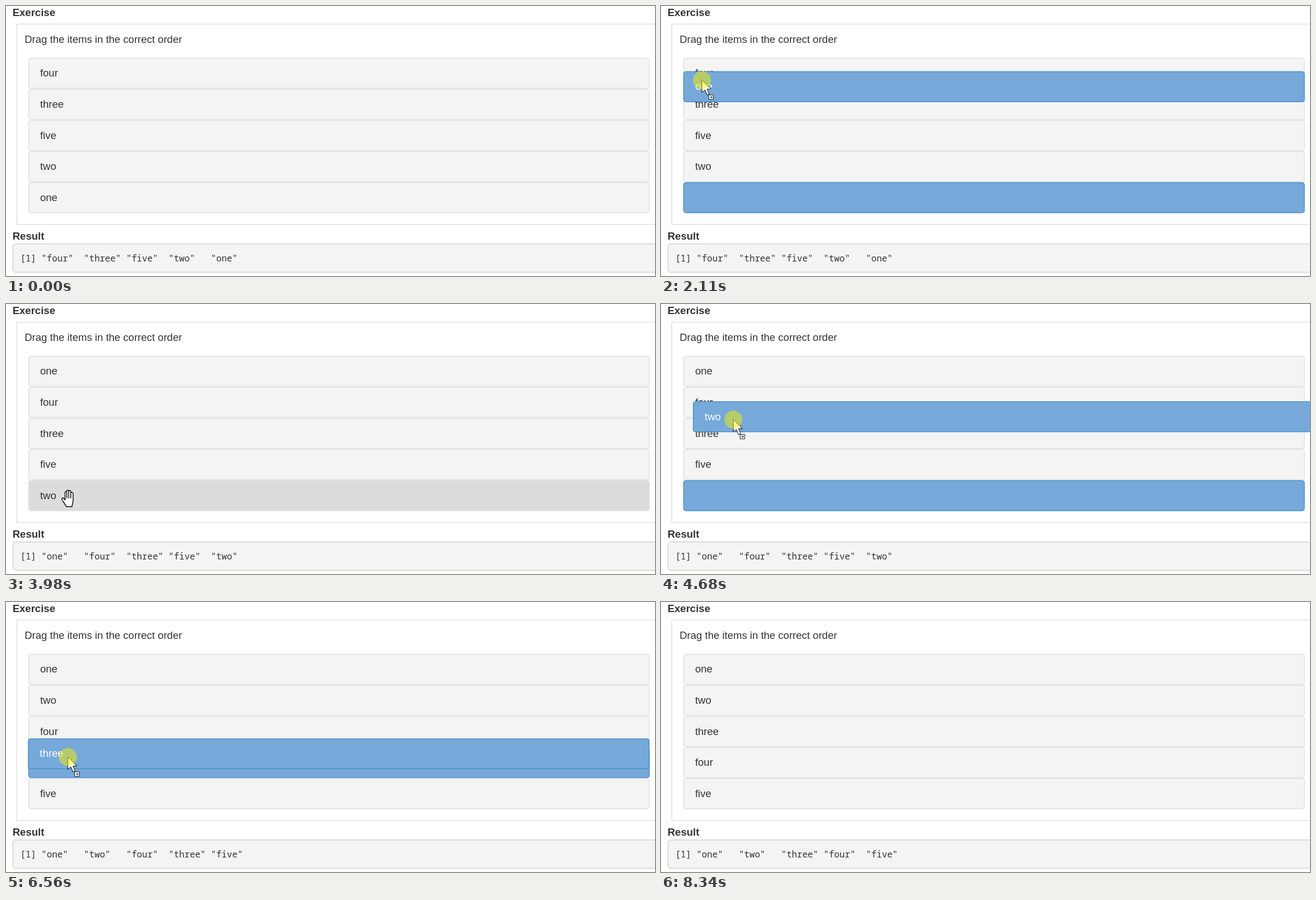
Animation, 1159 px wide and 483 px high, one loop 9.98 s. Source, as an HTML page:

```html
<!DOCTYPE html>
<html lang="en">
<head>
<meta charset="utf-8">
<title>Sortable exercise</title>
<style>
  html, body { margin: 0; width: 100%; height: 100%; overflow: hidden; background: #fff; }
  svg { display: block; }
  text { font: 18.54px "Liberation Sans", Arial, sans-serif; fill: #333; white-space: pre; }
  .heading { font-weight: bold; }
  .code { font: 15.78px "Noto Sans Mono", "DejaVu Sans Mono", monospace; }
  .frame { fill: #fff; stroke: #ddd; stroke-width: 1.3; }
  .output { fill: #f4f4f4; stroke: #ccc; stroke-width: 1.3; }
  .item rect { fill: #f4f4f4; stroke: #ddd; stroke-width: 1.3; }
  .item.hover rect { fill: #dcdcdc; }
  .item.active rect { fill: #76a9da; stroke: #428bca; }
  .item.active text { fill: #fff; }
  .pointer { fill: #fff; stroke: #000; stroke-linejoin: round; stroke-linecap: round; }
</style>
</head>
<body>
<svg id="stage" width="1159" height="483">
  <text class="heading" x="11.7" y="18">Exercise</text>
  <rect class="frame" x="19.3" y="32.4" width="1160" height="358.4"/>
  <text x="33.2" y="65.5">Drag the items in the correct order</text>
  <g id="list"></g>
  <text class="heading" x="11.7" y="417.5">Result</text>
  <rect class="output" x="12.5" y="425.7" width="1170" height="50.6" rx="5"/>
  <text id="result" class="code" x="25.5" y="456.5"></text>
  <g id="ghost"></g>
  <g id="cursor">
    <path id="arrow" class="pointer" d="M0 0V17L4 13.3L7 20.2L10 18.9L7.1 12.2H12.2Z"/>
    <g id="badge" class="pointer" stroke-width=".9">
      <rect x="12.5" y="26.5" width="8" height="8"/>
      <path fill="none" d="M14.5 30.5H18.3M16.5 28.5L18.5 30.5L16.5 32.5"/>
    </g>
    <path id="hand" class="pointer" stroke-width="1.4" transform="translate(-13 -16)"
      d="M8.5 30.5C7 26 3 22 .9 17.5C.3 15.3 2.6 14 4.3 15.8L6.5 18.5V5C6.5 2.6 9.3 2.6 9.6 5V3
         C9.8 .3 12.8 .3 13.1 3C13.4 .9 16.4 .9 16.7 3.8V6.2C17 4.3 20.6 4.2 20.8 7V20
         C20.8 24 19.3 26 18.8 30.5ZM9.6 5V15M13.1 3V15M16.7 4V15"/>
    <circle id="press" r="16" fill="#f4f000" fill-opacity=".5"/>
  </g>
</svg>
<script>
const LOOP = 9980, ENTER = 710, EXIT = 8340;
const ROW = 55.6, ITEM = 55.2, TOP = 92.8, LEFT = 39.8, RIGHT = 1149.6, BORDER = 1.3;
const SLIDE = 150, HOVER_LAG = 150, SETTLE = 200, REPORT = 640, LABEL = 350;
const START_ORDER = ["four", "three", "five", "two", "one"];

const linear = p => p;
const easeOut = p => p * (2 - p);
const lerp = (a, b, p) => a + (b - a) * p;
const clamp01 = v => Math.max(0, Math.min(1, v));
const stop = (time, [x, y], ease = linear) => ({ time, x, y, ease });

// Each drag: rows, pointer positions, times, and where the pointer heads afterwards
const DRAGS = [
  { from: 4, to: 0, pick: [73, 331], release: [73, 109],
    start: 1410, swap: 2550, drop: 2630, leave: 2830, next: stop(3280, [97, 199]) },
  { from: 4, to: 1, pick: [112, 348], release: [130, 200],
    start: 4210, swap: 4910, drop: 5230, leave: 5730, next: stop(5850, [125, 235]) },
  { from: 3, to: 2, pick: [111, 293], release: [109, 239],
    start: 6490, swap: 7040, drop: 7420, leave: 7640, next: stop(8260, [120, 520]) },
];

const PATH = [
  stop(ENTER, [21, 305]),
  ...DRAGS.flatMap(d => [
    stop(d.start - 270, d.pick),
    stop(d.start, d.pick),
    stop(d.swap - 100, d.release, easeOut),
    stop(d.leave, d.release),
    d.next,
  ]),
];

const $ = id => document.getElementById(id);
const show = (el, on) => el.setAttribute("visibility", on ? "visible" : "hidden");
const move = (el, x, y) => el.setAttribute("transform", `translate(${x} ${y})`);

function pointerAt(t) {
  const b = PATH.find(s => s.time > t) ?? PATH.at(-1);
  const a = PATH[Math.max(0, PATH.indexOf(b) - 1)];
  const p = b.ease(clamp01((t - a.time) / (b.time - a.time || 1)));
  return { x: lerp(a.x, b.x, p), y: lerp(a.y, b.y, p) };
}

function rowAt({ x, y }) {
  const row = Math.floor((y - TOP) / ROW);
  return x >= LEFT && row >= 0 && row < START_ORDER.length ? row : -1;
}

function reorder(order, { from, to }) {
  const next = order.slice();
  next.splice(to, 0, next.splice(from, 1)[0]);
  return next;
}

const orderAfter = (t, delay) =>
  DRAGS.filter(d => t >= d.drop + delay).reduce(reorder, START_ORDER);

function makeItem(parent, label, className) {
  const g = document.createElementNS("http://www.w3.org/2000/svg", "g");
  g.setAttribute("class", className);
  g.innerHTML = `<rect x="${LEFT + BORDER / 2}" y="${BORDER / 2}" rx="4"
      width="${RIGHT - LEFT - BORDER}" height="${ITEM - BORDER}"/>
    <text x="60.9" y="33.6">${label}</text>`;
  return parent.appendChild(g);
}

const items = Object.fromEntries(START_ORDER.map(name => [name, makeItem($("list"), name, "item")]));
const ghost = makeItem($("ghost"), "", "item active");

function hoverRow(t, drag) {
  if (drag) return t >= drag.swap + SLIDE ? drag.from : -1;
  return t < EXIT ? rowAt(pointerAt(t - HOVER_LAG)) : -1;
}

function drawList(t, order, drag) {
  const after = drag ? reorder(order, drag) : order;
  const slide = drag ? clamp01((t - drag.swap) / SLIDE) : 0;
  const hover = hoverRow(t, drag);
  const held = drag && order[drag.from];

  order.forEach((name, row) => {
    const el = items[name], target = after.indexOf(name);
    const state = name === held ? " active" : target === hover ? " hover" : "";
    el.setAttribute("class", "item" + state);
    move(el, 0, TOP + lerp(row, target, slide) * ROW);
    show(el.lastChild, name !== held || t < drag.start + LABEL);
  });
  if (held) $("list").appendChild(items[held]);
}

function drawGhost(t, drag, label) {
  const now = pointerAt(t), [x, y] = drag.pick;
  ghost.lastChild.textContent = label;
  move(ghost, now.x - x, TOP + drag.from * ROW + now.y - y);
}

function drawCursor(t, drag, dragging) {
  const visible = t >= ENTER && t < EXIT;
  const at = pointerAt(t);
  const overList = !drag && rowAt(at) >= 0;
  const scale = dragging ? 1.32 : 1.6;
  move($("cursor"), at.x, at.y);
  $("arrow").setAttribute("transform", `scale(${scale})`);
  $("arrow").setAttribute("stroke-width", 1 / scale);
  show($("arrow"), visible && !overList);
  show($("hand"), visible && overList);
  show($("badge"), dragging);
  show($("press"), dragging);
}

function draw(t) {
  const drag = DRAGS.find(d => t >= d.start && t < d.drop + SETTLE);
  const dragging = Boolean(drag && t < drag.drop);
  const order = orderAfter(t, SETTLE);

  drawList(t, order, drag);
  show(ghost, dragging);
  if (dragging) drawGhost(t, drag, order[drag.from]);
  drawCursor(t, drag, dragging);
  $("result").textContent =
    "[1] " + orderAfter(t, REPORT).map(name => `"${name}"`.padEnd(7)).join(" ");
}

function tick() {
  draw(performance.now() % LOOP);
  requestAnimationFrame(tick);
}
tick();
</script>
</body>
</html>
```
